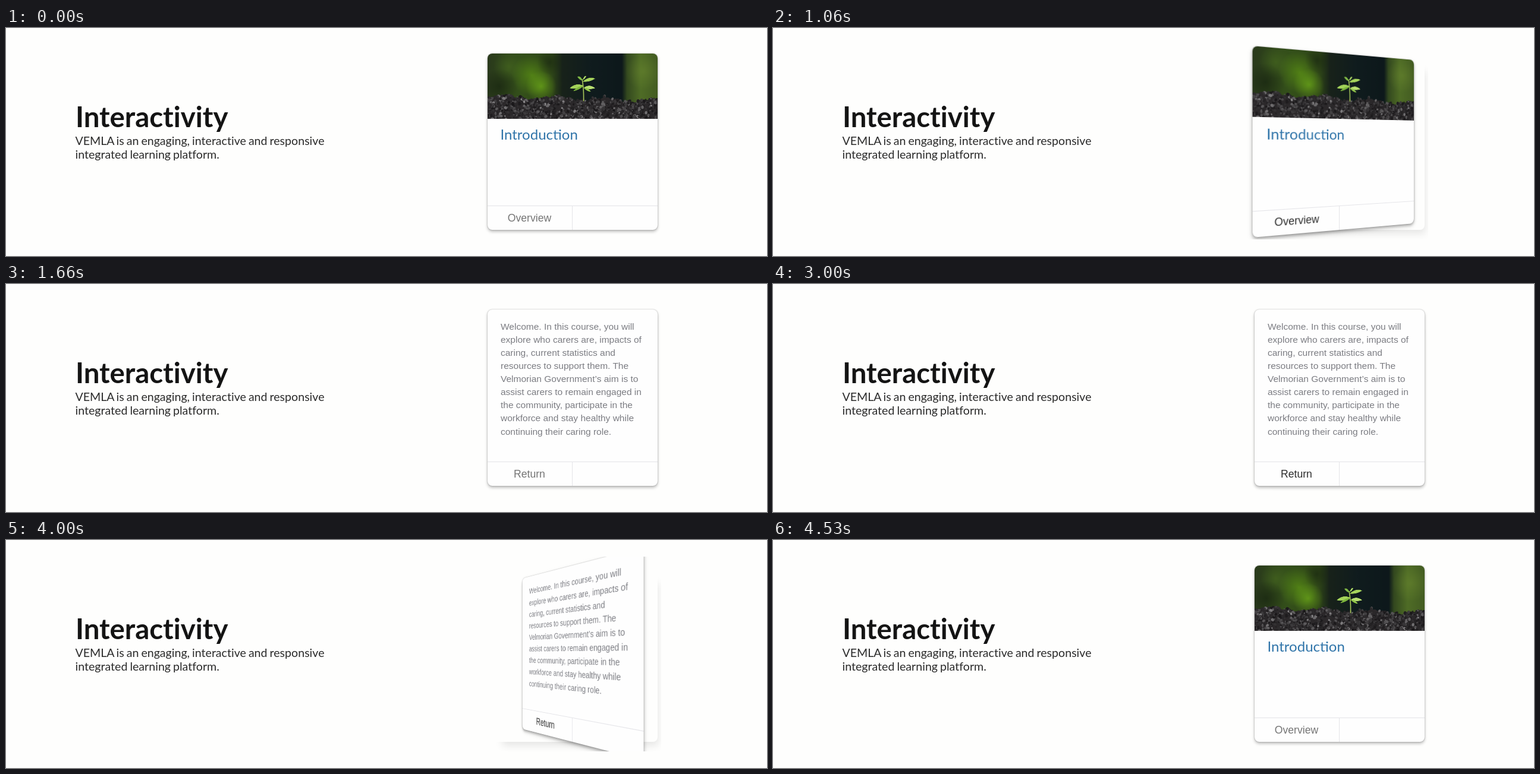
These frames come from a looping animation (1280x384 px, 5000 ms). An HTML page with a canvas:

```html
<!DOCTYPE html>
<html lang="en">
<head>
<meta charset="utf-8">
<title>Interactivity</title>
<style>
html, body { margin: 0; width: 100%; height: 100%; overflow: hidden; background: #fefefd; }
text { font-variant-ligatures: none; }
#copy { position: absolute; left: 0; top: 0; font-family: Lato, sans-serif; }
.lead { font-size: 19.6px; word-spacing: -1px; fill: #2b2b2b; }
#scene { position: absolute; left: 797px; top: 27.5px; width: 305px; height: 328px; overflow: hidden; --lift: 0; }
#base, .face { position: absolute; left: 13px; top: 15.5px; width: 286px; height: 297px; border-radius: 8px; }
#base { box-shadow: 13px 18px 13px -12px rgba(0,0,0,calc(.1 * var(--lift))); }
.face {
  overflow: hidden; background: #fefefe;
  box-shadow: 0 0 2px rgba(0,0,0,.32), 0 3px 5px rgba(0,0,0,.26), 0 4px 10px rgba(0,0,0,calc(.14 * var(--lift)));
}
.face svg, .face canvas { position: absolute; left: 0; top: 0; }
.face canvas { width: 286px; height: 109.5px; }
.face text { font-family: "Liberation Sans", Arial, sans-serif; }
.label { font-size: 17.6px; text-anchor: middle; }
.face .title { font: 24px Lato, sans-serif; fill: #2f74a9; }
.para { font-size: 15.5px; fill: #7b7c82; }
.rule { stroke: #e4e4e8; fill: none; }
</style>
</head>
<body>
<svg id="copy" width="1280" height="384">
  <text x="117" y="167" font-size="47.4" font-weight="700" fill="#141414">Interactivity</text>
  <text class="lead" x="116.5" y="197">VEMLA <tspan x="185.5">is an engaging, interactive and responsive</tspan></text>
  <text class="lead" x="116.5" y="220.3">integrated learning platform.</text>
</svg>
<div id="scene">
  <div id="base"></div>
  <div class="face" id="front">
    <canvas id="photo" width="572" height="219"></canvas>
    <svg width="286" height="297">
      <text class="title" x="21.5" y="145">Introduction</text>
      <path class="rule" d="M0 256.5H286M142.5 257V297"/>
      <text class="label" x="70.5" y="282.5">Overview</text>
    </svg>
  </div>
  <div class="face" id="back">
    <svg width="286" height="297">
      <g class="para" id="para"></g>
      <path class="rule" d="M0 256.5H286M142.5 257V297"/>
      <text class="label" x="70.5" y="282.5">Return</text>
    </svg>
  </div>
</div>
<script>
const $ = id => document.getElementById(id);
const front = $('front'), back = $('back'), scene = $('scene');
const LOOP = 5000, FPS = 15;

const lines = [
  'Welcome. In this course, you will',
  'explore who carers are, impacts of',
  'caring, current statistics and',
  'resources to support them. The',
  'Velmorian Government’s aim is to',
  'assist carers to remain engaged in',
  'the community, participate in the',
  'workforce and stay healthy while',
  'continuing their caring role.'
];
$('para').innerHTML = lines.map((s, i) => `<text x="22" y="${33.5 + i * 22.13}">${s}</text>`).join('');

// Seedling in soil against a blurred wood
function drawPhoto() {
  const c = $('photo').getContext('2d');
  c.scale(2, 2);
  let seed = 7;
  const rnd = () => (seed = seed * 16807 % 2147483647) / 2147483647;

  const sky = c.createLinearGradient(0, 0, 286, 0);
  [[0, '#2a3a1c'], [.2, '#34501a'], [.38, '#2e4518'], [.44, '#18221a'], [.6, '#101c1e'],
   [.79, '#0d181b'], [.82, '#33481f'], [.9, '#4f6c26'], [1, '#435c22']]
    .forEach(([p, col]) => sky.addColorStop(p, col));
  c.fillStyle = sky;
  c.fillRect(0, 0, 286, 110);

  const glow = (x, y, r, rgb, a) => {
    const g = c.createRadialGradient(x, y, 0, x, y, r);
    g.addColorStop(0, `rgba(${rgb},${a})`);
    g.addColorStop(1, `rgba(${rgb},0)`);
    c.fillStyle = g;
    c.fillRect(x - r, y - r, 2 * r, 2 * r);
  };
  glow(74, 36, 34, '100,160,20', .6);
  glow(90, 55, 26, '115,180,25', .65);
  glow(36, 22, 26, '85,125,35', .4);
  glow(262, 30, 30, '115,145,50', .4);
  glow(20, 55, 30, '15,25,12', .5);
  glow(105, 14, 22, '20,32,14', .5);

  const ground = x => 71 + x * .025 + 3 * Math.sin(x * .075 + 2.5) + 1.5 * Math.sin(x * .31);
  c.fillStyle = '#2b282a';
  c.beginPath();
  c.moveTo(0, 110);
  for (let x = 0; x <= 286; x += 2) c.lineTo(x, ground(x) + rnd() * 2);
  c.lineTo(286, 110);
  c.fill();
  for (let i = 0; i < 1100; i++) {
    const x = rnd() * 286, y = ground(x) + rnd() * (110 - ground(x));
    const v = 24 + rnd() * rnd() * 120, r = .6 + rnd() * 1.9;
    c.fillStyle = `rgb(${v + 2},${v},${v + 2})`;
    c.beginPath();
    c.ellipse(x, y, r * 1.3, r, rnd() * 3, 0, 7);
    c.fill();
  }

  c.strokeStyle = '#a9c95a';
  c.lineWidth = 1.6;
  c.beginPath();
  c.moveTo(161.5, 80);
  c.quadraticCurveTo(162, 58, 159, 43);
  c.stroke();
  const leaf = (x, y, tx, ty, bend, col) => {
    const mx = (x + tx) / 2, my = (y + ty) / 2;
    c.fillStyle = col;
    c.beginPath();
    c.moveTo(x, y);
    c.quadraticCurveTo(mx, my - bend, tx, ty);
    c.quadraticCurveTo(mx, my + bend * .6, x, y);
    c.fill();
  };
  leaf(161, 54, 138, 58, 8, '#a3d25a');
  leaf(161, 55, 144, 63, 5, '#7db53c');
  leaf(162, 57, 181, 58, 7, '#b9e072');
  leaf(162, 58, 174, 64, 5, '#92c84a');
  leaf(160, 47, 181, 42, 7, '#a6d45c');
  leaf(160, 45, 151, 39, 6, '#7fb845');
  leaf(160, 44, 166, 38, 5, '#b0dc68');
}
drawPhoto();

const clamp = x => Math.max(0, Math.min(1, x));
// Half turn that shows from `on`, already `lead` ms under way
const turn = (t, on, lead, dur) => t < on ? 0 : 180 * Math.sin(clamp((t - on + lead) / dur) * Math.PI / 2);

function pose(face, angle, dark) {
  face.style.display = Math.abs(angle) < 90 ? 'block' : 'none';
  face.style.transform = angle ? `perspective(600px) rotateY(${angle}deg)` : 'none';
  face.querySelector('.label').style.fill = dark ? '#2c2c2c' : '#747474';
}

function render(now) {
  const t = Math.floor((now % LOOP) * FPS / 1000 + .15) * 1000 / FPS;
  const angle = turn(t, 1060, 30, 530) - turn(t, 3995, 95, 605);
  const first = t > 460 && t < 1595, second = t > 2995 && t < 4530;
  pose(front, angle, first);
  pose(back, angle - 180, second);
  const lift = first ? clamp((t - 400) / 460) : second ? clamp((t - 2935) / 500) : 0;
  scene.style.setProperty('--lift', lift);
}

const start = performance.now();
function tick() {
  render(performance.now() - start);
  requestAnimationFrame(tick);
}
tick();
</script>
</body>
</html>
```
